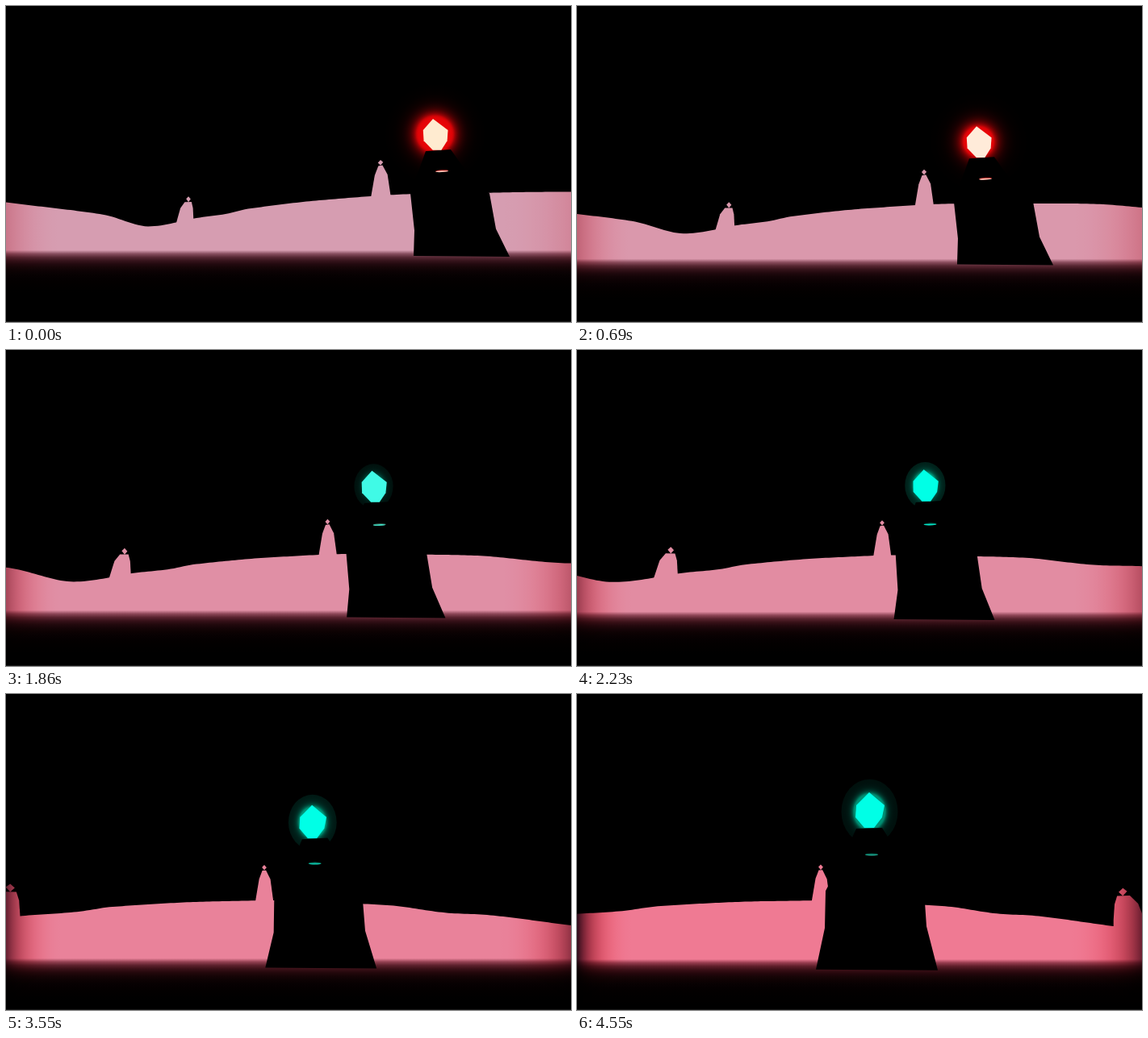
Write an HTML page with a canvas that moves like this. It is 700 px wide and 392 px high and loops after 4.62 s.

```html
<!DOCTYPE html>
<html lang="en">
<head>
<meta charset="utf-8">
<title>Candle shore</title>
<style>
  html, body { margin: 0; width: 100%; height: 100%; overflow: hidden; background: #000; }
  canvas { display: block; }
</style>
</head>
<body>
<canvas id="stage" width="700" height="392"></canvas>
<script>
const W = 700, H = 392, LOOP = 4620, STEP = 77, LAST = 59;
const FOCAL = 300; // the camera turns, so the far shore lives on a cylinder
const ctx = document.getElementById('stage').getContext('2d');

// Screen x of the middle spire over the steps of the loop.
const panPath = [[0, 464], [9, 430], [19, 416], [29, 378], [39, 351], [46, 320], [59, 302]];
// Skyline: angle from the middle spire, height.
const skyline = [[-1.226, -21], [-1.018, -14], [-0.888, -3], [-0.724, -12.7], [-0.62, -17.5],
  [-0.53, -24], [-0.2, -35], [0.045, -37.8], [0.33, -33.5], [0.5, -29], [0.69, -18],
  [0.77, -15.7], [0.97, -3.5]];
const flame = [[0, 0], [19, 16], [16, 31], [6, 44], [-6, 44], [-17, 31], [-16, 16]];

const mix = (a, b, t) => a + (b - a) * t;
const clamp = v => Math.max(0, Math.min(1, v));
const decay = (i, span) => Math.exp(-i / span);
const rgb = c => `rgb(${c.map(v => Math.round(v))})`;
const blend = (a, b, t) => a.map((v, n) => mix(v, b[n], t));
const smooth = (a, b, x) => {
  const t = clamp((x - a) / (b - a));
  return t * t * (3 - 2 * t);
};

// Monotone cubic through [x, y] points.
function curve(pts, x) {
  const n = pts.length - 1;
  if (x <= pts[0][0]) return pts[0][1];
  if (x >= pts[n][0]) return pts[n][1];
  const i = pts.findIndex(p => p[0] >= x) - 1;
  const sec = j => (pts[j + 1][1] - pts[j][1]) / (pts[j + 1][0] - pts[j][0]);
  const slope = j => {
    const a = sec(Math.max(j - 1, 0)), b = sec(Math.min(j, n - 1));
    return a * b <= 0 ? 0 : 2 * a * b / (a + b);
  };
  const d = pts[i + 1][0] - pts[i][0], t = (x - pts[i][0]) / d, s = 1 - t;
  return s * s * ((1 + 2 * t) * pts[i][1] + t * d * slope(i)) +
         t * t * ((1 + 2 * s) * pts[i + 1][1] - s * d * slope(i + 1));
}

function poseAt(i) {
  const p = i / LAST, pan = curve(panPath, i);
  const turn = smooth(12, 52, i), near = p ** 3;
  const bodyX = pan + 86 - 19 * smooth(14, 30, i);
  return {
    i, p, pan, turn, near, bodyX,
    eye: 293.2 - 16.2 * decay(i, 11),
    rise: 0.96 + 0.08 * decay(i, 25),
    shore: 331 - 27 * decay(i, 18),
    foot: 345.5 - 35 * decay(i, 25),
    tipX: bodyX - mix(21, 7, turn),
    tipY: 152 - 30 * near - 12 * decay(i, 6),
    cool: clamp((i - 19.5) / 6)
  };
}

function fill(points, style) {
  ctx.beginPath();
  points.forEach(([x, y]) => ctx.lineTo(x, y));
  ctx.closePath();
  ctx.fillStyle = style;
  ctx.fill();
}

// Adds evenly spaced stops from a function of 0..1.
function ramp(gradient, color, n = 16) {
  for (let k = 0; k <= n; k++) gradient.addColorStop(k / n, rgb(color(k / n)));
  return gradient;
}

function drawLand(s) {
  const heading = Math.atan((s.pan - W / 2) / FOCAL);
  const place = (u, h) => [W / 2 + FOCAL * Math.tan(heading + u), s.eye + h / Math.cos(heading + u)];
  const [r, g, b] = blend([214, 157, 177], [239, 122, 147], s.p);
  const paint = ramp(ctx.createLinearGradient(0, s.shore - 1, 0, s.shore + 69), t => {
    const k = decay(t * 70, 11) * (1 - t);
    return [r * k, g * k ** 1.5, b * k ** 1.35];
  });

  const ground = [[0, H], [W, H]];
  for (let x = W; x >= 0; x -= 4) {
    const a = Math.atan((x - W / 2) / FOCAL);
    ground.push([x, s.eye + curve(skyline, a - heading) * s.rise / Math.cos(a)]);
  }
  fill(ground, paint);

  const shape = (u, side, pts) => {
    if (Math.abs(heading + u) < 1.1) fill(pts.map(([du, h]) => place(u + du * side, h)), paint);
  };
  const gem = (u, top, r) => shape(u, 1, [[0, top], [r, top + 3], [0, top + 6.5], [-r, top + 3]]);
  const hut = (u, side, drop) => {
    gem(u, drop - 37.7, 0.008);
    shape(u, side, [[-0.013, -31], [0.011, -31.5], [0.016, -24.5], [0.018, -11], [0.018, -3],
      [-0.044, -5], [-0.028, -24]].map(([du, h]) => [du, h + drop]));
  };
  hut(-0.755, 1, 0);
  hut(0.986, -1, 2.3);
  gem(0, -80.5, 0.0095);
  shape(0, 1, [[-0.008, -73.5], [0.007, -74], [0.025, -63], [0.038, -34], [-0.037, -34], [-0.021, -63]]);

  // Edges multiply towards dark red, so the black sky stays black.
  const shade = (x, span, dark) => {
    ctx.fillStyle = ramp(ctx.createLinearGradient(x, 0, x + span, 0), t => {
      const a = dark * (1 - t) ** 2;
      return [255 * (1 - a * a), 255 * (1 - a), 255 * (1 - 0.9 * a)];
    });
    ctx.fillRect(Math.min(x, x + span), 0, Math.abs(span), H);
  };
  ctx.globalCompositeOperation = 'multiply';
  shade(0, 70, mix(0.25, 0.9, s.p));
  shade(W, -90, mix(0.15, 0.75, s.p));
  ctx.globalCompositeOperation = 'source-over';
}

function halo(x, y, r, stretch, color) {
  ctx.save();
  ctx.translate(x, y);
  ctx.scale(1, stretch);
  ctx.globalCompositeOperation = 'lighter';
  ctx.fillStyle = ramp(ctx.createRadialGradient(0, 0, 0, 0, 0, r), t => color(t * r), 30);
  ctx.beginPath();
  ctx.arc(0, 0, r, 0, 7);
  ctx.fill();
  ctx.restore();
}

function drawCandle(s) {
  const { tipX, tipY, turn, near, bodyX, foot, cool } = s;
  const at = (dx, dy) => [tipX + dx, tipY + dy];
  const [cx, cy] = at(mix(2.5, 0.5, turn), mix(19, 24, near));

  const warm = clamp(1 - cool * 2), core = 16 + 6 * decay(s.i, 9);
  if (warm > 0) halo(cx, cy, 62, 1, d => {
    const v = warm * decay(Math.max(0, d - core), 7.5) * (1 - d / 62) ** 0.25;
    return [250 * v, 4 * v, 8 * v];
  });
  const chill = clamp(cool * 2 - 1), reach = 22 + 13 * s.p ** 2;
  if (chill > 0) halo(cx, cy, reach, 1.15, d => {
    const v = chill * (0.5 * decay(Math.max(0, d - 0.55 * reach), 3) + 0.12 * (1 - 0.5 * near));
    return [0, 255 * v, 205 * v];
  });

  const half = 49 + 12 * near, hip = foot - 34 - 20 * s.p ** 2;
  const chest = foot - 78 - 20 * near;
  fill([
    at(mix(-9, -16, near), mix(40, 45, near)), at(mix(22, 16, near), mix(38, 44, near)),
    at(mix(41, 36, near), mix(65, 76, near)),
    [bodyX + half, chest], [bodyX + half + 8 - 5 * turn, hip],
    [bodyX + half + 25 - 8 * turn, foot + 0.5], [bodyX - half + 4 - 16 * turn, foot - 0.5],
    [bodyX - half + 5 - 6 * turn, hip + 2], [bodyX - half, chest],
    at(mix(-19, -30, near), mix(68, 76, near))
  ], '#000');

  const cream = [255, 235, mix(208, 228, clamp(s.i / 19))];
  const size = 0.88 + 0.12 * near, lean = 0.13 * (1 - turn);
  fill(flame.map(([x, y]) => at((x + lean * y) * size, y * size)), rgb(blend(cream, [0, 255, 230], cool)));

  // Lit mouth: a thin sliver with a coloured upper rim.
  const [mx, my] = at(mix(11, 3, turn), 65 + 12.5 * s.p ** 2);
  const sliver = (dy, ry, color) => {
    ctx.beginPath();
    ctx.ellipse(mx, my + dy, 8, ry, -0.05 * (1 - turn), 0, 7);
    ctx.fillStyle = rgb(color);
    ctx.fill();
  };
  sliver(-0.4, 1.4, blend([170, 20, 20], [0, 100, 82], cool));
  sliver(0.2, 0.9, blend([255, 205, 190], blend([0, 240, 210], [30, 150, 130], near), cool));
}

function draw(time) {
  const s = poseAt(Math.min(LAST, Math.floor((time % LOOP + 6) / STEP)));
  ctx.fillStyle = '#000';
  ctx.fillRect(0, 0, W, H);
  drawLand(s);
  drawCandle(s);
  ctx.fillStyle = '#1a1a1a';
  ctx.fillRect(0, H - 1, W, 1);
}

const start = performance.now();
function tick() {
  draw(performance.now() - start);
  requestAnimationFrame(tick);
}
tick();
</script>
</body>
</html>
```
